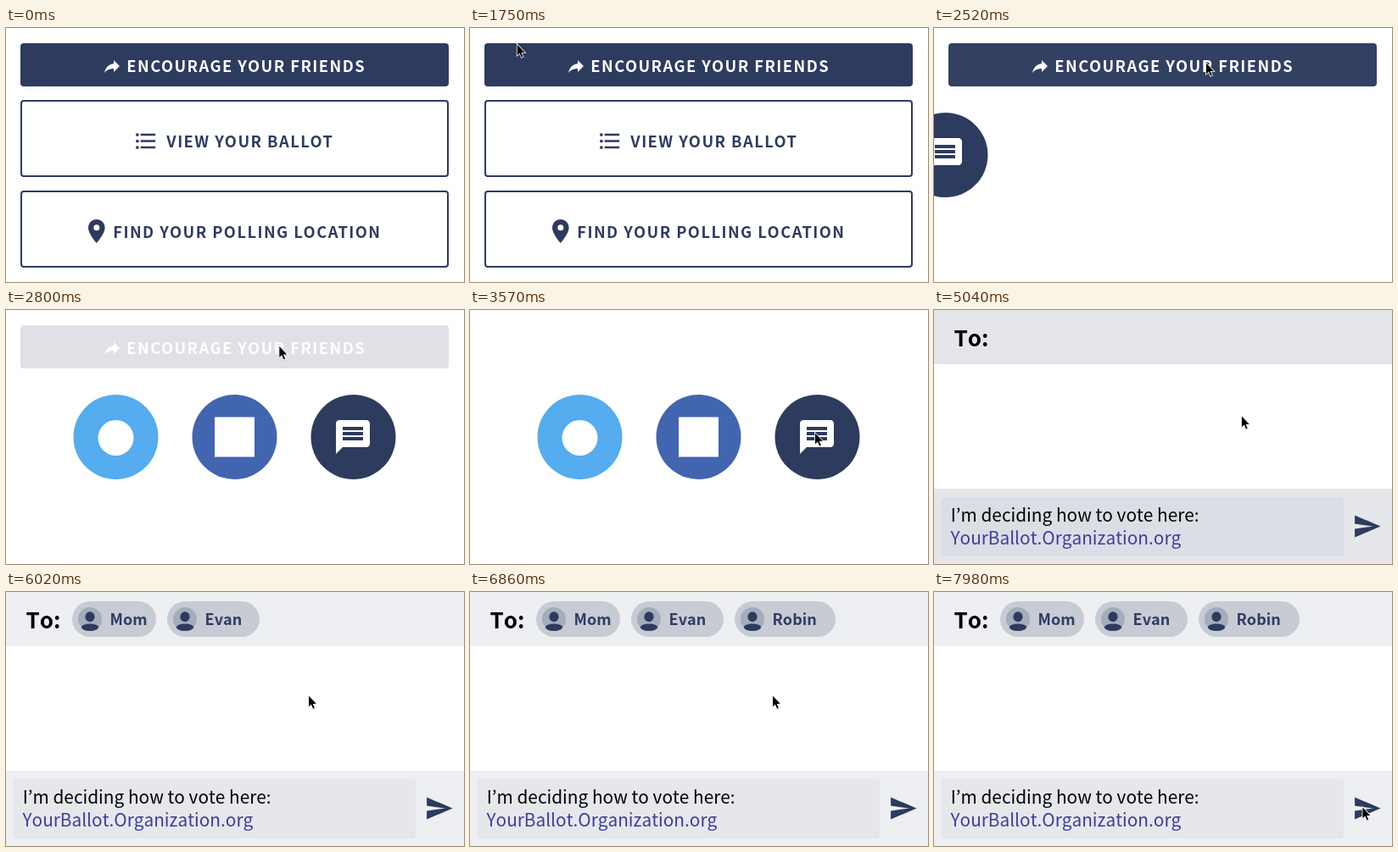
An HTML page for the animation above (8 s loop, 540 px wide and 300 px high).

```html
<!DOCTYPE html>
<html lang="en">
<head>
<meta charset="utf-8">
<title>Share your ballot</title>
<style>
  html, body { margin: 0; width: 100%; height: 100%; overflow: hidden; background: #fff; }
  svg { display: block; width: 540px; height: 300px; }
  text { font-family: "Noto Sans CJK KR", "Noto Sans CJK JP", "Noto Sans CJK SC", "Noto Sans CJK", "Noto Sans", sans-serif; }
  .label { font-size: 18.35px; font-weight: 700; letter-spacing: 1.43px; text-anchor: middle; }
  #panel text { font-kerning: none; }
  .name { font-size: 18px; font-weight: 700; fill: #2f3c61; }
  .msg { font-size: 20.8px; }
  .navy { fill: #2d3b5e; }
  .box { fill: #fff; stroke: #2d3b5e; stroke-width: 2; }
</style>
</head>
<body>
<svg viewBox="0 0 540 300" xmlns="http://www.w3.org/2000/svg">
  <g id="menu" class="navy">
    <rect class="box" x="18" y="86" width="503" height="89" rx="3"/>
    <g transform="translate(149.9 118.5) scale(1.25)">
      <circle cx="4" cy="6" r="1.5"/><circle cx="4" cy="12" r="1.5"/><circle cx="4" cy="18" r="1.5"/>
      <path d="M7 5h14v2H7zM7 11h14v2H7zM7 17h14v2H7z"/>
    </g>
    <text class="label" x="287.9" y="140.8">VIEW YOUR BALLOT</text>
    <rect class="box" x="18" y="193" width="503" height="89" rx="3"/>
    <path transform="translate(90 223.2) scale(1.4)" fill-rule="evenodd"
      d="M12 2C8.13 2 5 5.13 5 9c0 5.25 7 13 7 13s7-7.75 7-13c0-3.87-3.13-7-7-7zM12 11.5a2.5 2.5 0 1 1 0-5 2.5 2.5 0 0 1 0 5z"/>
    <text class="label" x="284.4" y="247.8">FIND YOUR POLLING LOCATION</text>
  </g>

  <g id="button" fill="#fff">
    <rect class="navy" x="17" y="18" width="505" height="51" rx="4"/>
    <path transform="translate(113 33)" d="M14 9V5l7 7-7 7v-4.1c-5 0-8.5 1.6-11 5.1 1-5 4-10 11-11z"/>
    <text class="label" x="283.2" y="51.8">ENCOURAGE YOUR FRIENDS</text>
  </g>

  <g id="panel">
    <g id="bars"><rect width="540" height="64"/><rect y="211" width="540" height="89"/></g>
    <rect id="field" x="8" y="221" width="475" height="70" rx="4"/>
    <text x="23.5" y="43" font-size="26" font-weight="700">To:</text>
    <text class="msg" x="19.7" y="250">I’m deciding how to vote here:</text>
    <text class="msg" x="19.5" y="277.4" fill="#3b3f9c">YourBallot.Organization.org</text>
    <path class="navy" transform="translate(493.2 238.1) scale(1.45)" d="M2 21L23 12 2 3v7l15 2-15 2z"/>
    <g id="chips"></g>
  </g>

  <g id="circles" fill="#fff">
    <circle cx="129.5" cy="150" r="50" fill="#55acee"/>
    <circle cx="129.5" cy="151" r="21"/>
    <circle cx="269.5" cy="150" r="50" fill="#4265b0"/>
    <rect x="246" y="126.5" width="47" height="47"/>
    <g id="chat">
      <circle class="navy" r="50"/>
      <path transform="translate(-24.5 -24) scale(2)" fill-rule="evenodd"
        d="M20 2H4c-1.1 0-2 .9-2 2v18l4-4h14c1.1 0 2-.9 2-2V4c0-1.1-.9-2-2-2zM6 6h12v2H6zM6 9h12v2H6zM6 12h12v2H6z"/>
    </g>
  </g>

  <g id="cursor">
    <path transform="translate(0 1)" opacity=".15" d="M.5.5V15.3L3.6 12.5 5.7 17.5 8.5 16.3 6.4 11.4H10.9z"/>
    <path d="M1 1.5V14.2L3.9 11.6 6.1 16.6 7.9 15.8 5.7 10.9H9.9z" stroke="#fff" stroke-width="1.6" paint-order="stroke"/>
  </g>
</svg>
<script>
const LOOP = 8000, STEP = 70;
const el = id => document.getElementById(id);
const ramp = (t, a, b) => Math.min(1, Math.max(0, (t - a) / (b - a)));
const mix = (a, b, p) => a + (b - a) * p;
const smooth = p => p * p * (3 - 2 * p);
const sine = p => (1 - Math.cos(Math.PI * p)) / 2;
const settle = p => 1 - (1 - p) ** 2.5;
const show = (id, on) => { el(id).style.display = on ? "" : "none"; };
const move = (node, x, y, more = "") => node.setAttribute("transform", `translate(${x} ${y})${more}`);
const shade = (a, b, p) => `rgb(${a.map((v, i) => Math.round(mix(v, b[i], p)))})`;

const chips = [
  { name: "Mom", x: 78, from: 460, w: 99, start: 5250 },
  { name: "Evan", x: 190, from: 540, w: 109, start: 5670 },
  { name: "Robin", x: 312, from: 540, w: 119, start: 6510 }
];
el("chips").innerHTML = chips.map((c, i) => `<g id="chip${i}">
  <rect width="${c.w}" height="42" rx="21" fill="#c7cbd4"/>
  <circle cx="21" cy="21" r="14" fill="#a5adbc"/>
  <g class="navy"><ellipse cx="21" cy="18.2" rx="5.6" ry="6"/><ellipse cx="21" cy="30.8" rx="10.2" ry="4.2"/></g>
  <text class="name" x="44.6" y="28">${c.name}</text></g>`).join("");

// Pointer moves: start, end, target x, target y, easing
const moves = [
  [1680, 2380, 320, 40, sine],
  [2795, 3600, 406, 144, settle],
  [3780, 3850, 406, 145, sine],
  [4550, 5180, 356, 121.2, sine],
  [7070, 7980, 504.4, 253, sine]
];

function pointer(t) {
  if (t < 1750) return [535, -2];
  let x = 48, y = 17.5;
  for (const [a, b, tx, ty, ease] of moves) {
    const p = ease(ramp(t, a, b));
    x = mix(x, tx, p);
    y = mix(y, ty, p);
  }
  return [x, y];
}

function draw(t) {
  const sent = t >= 4550;
  show("menu", t < 2520);
  show("panel", sent);
  show("circles", t >= 2520 && t < 4880);
  show("cursor", t >= 1750 || (t >= 630 && t < 700));

  el("button").setAttribute("opacity", 1 - ramp(t, 2510, 2850));
  move(el("circles"), mix(-442, 0, smooth(ramp(t, 2450, 2800))) + (sent ? 0.5 : 0), 0);
  el("circles").setAttribute("opacity", 1 - ramp(t, 4540, 4880));
  move(el("chat"), 409.5, 150, sent ? " scale(1.02)" : "");

  const light = ramp(t, 5250, 5600);
  el("bars").setAttribute("fill", shade([229, 230, 234], [238, 239, 242], light));
  el("field").setAttribute("fill", shade([220, 222, 229], [230, 231, 234], light));

  chips.forEach((c, i) => {
    show("chip" + i, t > c.start);
    move(el("chip" + i), mix(c.from, c.x, smooth(ramp(t, c.start, c.start + 350))), 11);
  });
  move(el("cursor"), ...pointer(t));
}

function tick() {
  const t = performance.now() % LOOP;
  draw(Math.floor(t / STEP) * STEP);
  requestAnimationFrame(tick);
}
tick();
</script>
</body>
</html>
```
